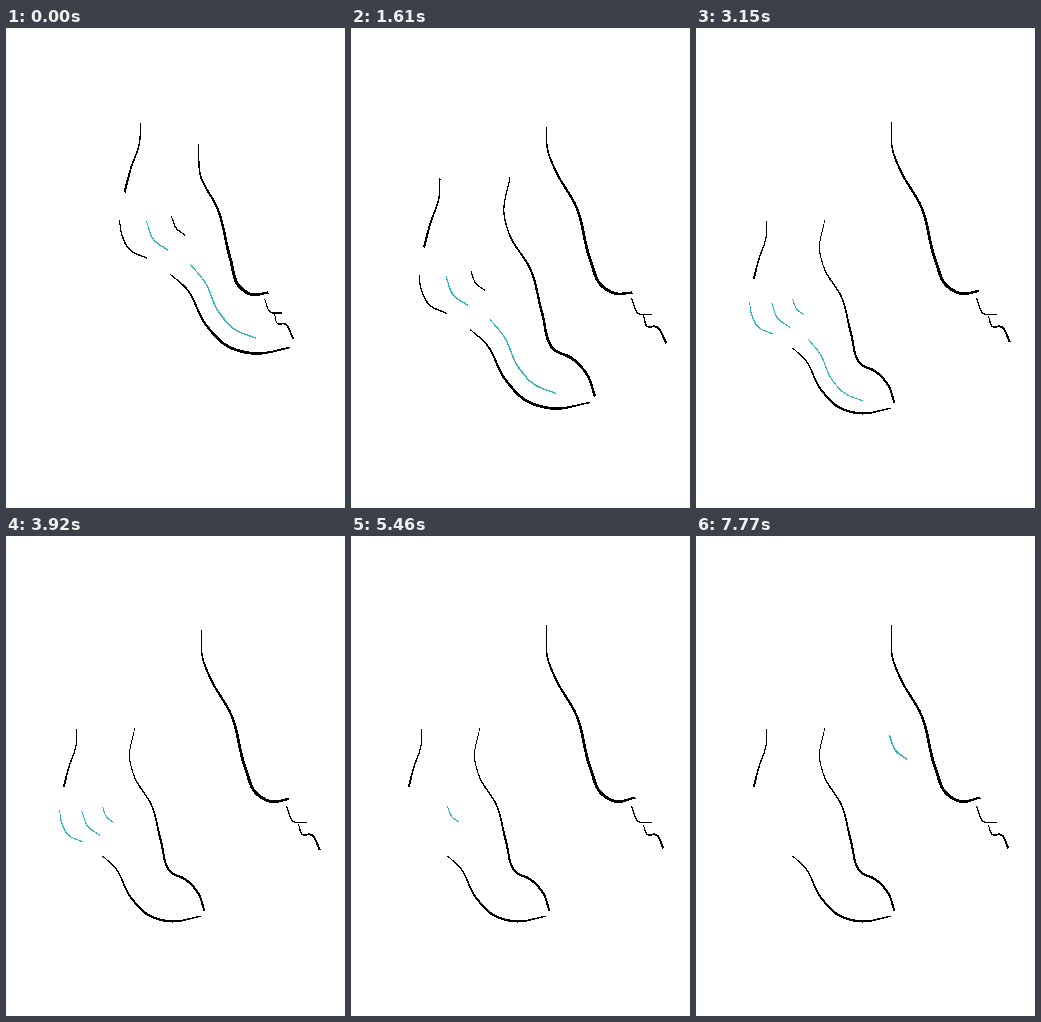
These frames come from a looping animation (339x480 px, 8 s). An HTML page:

```html
<!DOCTYPE html>
<html lang="en">
<head>
<meta charset="utf-8">
<title>Foot line study</title>
<style>
  html, body { margin: 0; width: 100%; height: 100%; overflow: hidden; background: #fff; }
  svg { display: block; width: 339px; height: 480px; }
</style>
</head>
<body>
<svg id="stage" viewBox="0 0 339 480" shape-rendering="crispEdges"></svg>
<script>
const stage = document.getElementById('stage');
const INK = '#000', TEAL = '#2fb5bb';
const LOOP = 8000, BEAT = 770, PAUSE = 70;

// Key points of each brush line, then widths spread evenly along it.
const shapes = {
  ankle: ['134,95 133,114 124,141 118,164', 1.1, 1.6, 2.4],
  heel: ['113,192 115,205 123,221 141,230', 1.1, 1.5, 1.3],
  arc: ['140,193 147,211 162,222', 1.1, 1.5, 1.3],
  tick: ['165,188 170,200 179,207', 1.1, 1.4, 1.2],
  arch: ['184,236 198,253 212,283 227,300 250,310', 1.1, 1.5, 1.3],
  sole: ['164,246 179,259 200,297 220,317 247,325 284,319', 1, 1.8, 2.7, 2.8, 1.5],
  instep: ['204,94 198,130 203,150 225,187 236,229 248,266 266,275 281,291 289,313', 1, 1.5, 2.5, 2.8, 2.3],
  shin: ['192,116 194,147 211,180 224,231 233,258 245,266 262,264', 1, 2, 2.9, 3.3, 2.3]
};

const mix = (a, b, t) => a + (b - a) * t;

// Hermite curve with chord-length timing, so uneven key points stay smooth.
function sample(text) {
  const pts = text.split(' ').map(p => p.split(',').map(Number));
  const time = [0];
  pts.slice(1).forEach((p, i) =>
    time.push(time[i] + Math.hypot(p[0] - pts[i][0], p[1] - pts[i][1])));
  const last = pts.length - 1;
  const slope = (i, j, k) => (pts[j][k] - pts[i][k]) / (time[j] - time[i]);
  const tangent = (i, k) => {
    if (i === 0) return slope(0, 1, k);
    if (i === last) return slope(last - 1, last, k);
    const before = time[i] - time[i - 1], after = time[i + 1] - time[i];
    return mix(slope(i - 1, i, k), slope(i, i + 1, k), before / (before + after));
  };
  const curve = [];
  for (let i = 0; i < last; i++) {
    const span = time[i + 1] - time[i];
    for (let n = 0; n < 12; n++) {
      const t = n / 12, s = 1 - t;
      curve.push([0, 1].map(k =>
        s * s * (1 + 2 * t) * pts[i][k] + t * t * (3 - 2 * t) * pts[i + 1][k]
        + span * t * s * (s * tangent(i, k) - t * tangent(i + 1, k))));
    }
  }
  return [...curve, pts[last]];
}

function brush([text, ...widths], color = INK) {
  const curve = sample(text), last = curve.length - 1;
  const left = [], right = [];
  curve.forEach(([x, y], i) => {
    const a = curve[Math.max(0, i - 1)], b = curve[Math.min(last, i + 1)];
    const dx = b[0] - a[0], dy = b[1] - a[1];
    const u = i / last * (widths.length - 1);
    const j = Math.min(widths.length - 2, Math.floor(u));
    const r = mix(widths[j], widths[j + 1], u - j) / 2 / Math.hypot(dx, dy);
    left.push([x - dy * r, y + dx * r]);
    right.unshift([x + dy * r, y - dx * r]);
  });
  const outline = [...left, ...right].map(p => p.map(v => v.toFixed(2)));
  return `<polygon points="${outline.join(' ')}" fill="${color}"/>`;
}

const draw = (names, color) =>
  names.split(' ').map(name => brush(shapes[name], color)).join('');
const place = (transform, content) => `<g transform="${transform}">${content}</g>`;

const toes = k =>
  brush(['280,270 287,285 301,286', 1.1, 1.5, 1.7]) +
  brush([`292,${287 + 2 * k} 296,298 304,298 ${315 - 3 * k},${315 - 3 * k}`, 1.1, 1.8, 2.2]);

// k stretches the front shin upward and lifts its toes.
const front = k => toes(k) + brush([
  `195,${99 - 10 * k} 196,121 203,140 225,179 239,232 250,257 264,265 ${281 + 3 * k},${264 - 3 * k}`,
  1, 2, 2.7, 3.2, 2.2]);

const bare = draw('ankle heel tick sole') + draw('arc arch', TEAL);
const whole = bare + draw('instep');
const outline = draw('ankle sole instep');
const small = content => place('matrix(.824 0 0 .835 -40 113.5)', content);

// The last mark travels from the heel to the front ankle and grows.
function travel(t) {
  const x = mix(96, 193, t), y = mix(270, 199, t), size = mix(.83, 1.25, t);
  return small(outline) +
    place(`translate(${x} ${y}) scale(${size}) translate(-165 -188)`, draw('tick', TEAL));
}

const backs = [
  bare,
  place('translate(-26.5 31.5)', whole),
  place('translate(-45.5 55)', whole),
  small(whole),
  ...['heel arc tick arch', 'heel arc tick', 'arc tick']
    .map(marks => small(outline + draw(marks, TEAL))),
  ...[0, 1, 2, 3].map(n => travel(n / 3))
];

function scene(i) {
  const relax = i < 4 ? 0 : Math.min(1, Math.max(.5, (i - 3) / 4));
  const lead = i ? front(relax)
    : draw('shin') + place('matrix(.82 0 0 .9 28.5 27)', toes(0));
  return place('translate(.5 .5)', lead + backs[i]);
}

const scenes = backs.map((_, i) => scene(i));
const start = performance.now();
let shown = -1;

function render() {
  const time = (performance.now() - start) % LOOP;
  const index = time < BEAT ? 0 : Math.max(1, Math.floor((time - PAUSE) / BEAT));
  if (index !== shown) {
    stage.innerHTML = scenes[index];
    shown = index;
  }
  requestAnimationFrame(render);
}
render();
</script>
</body>
</html>
```
